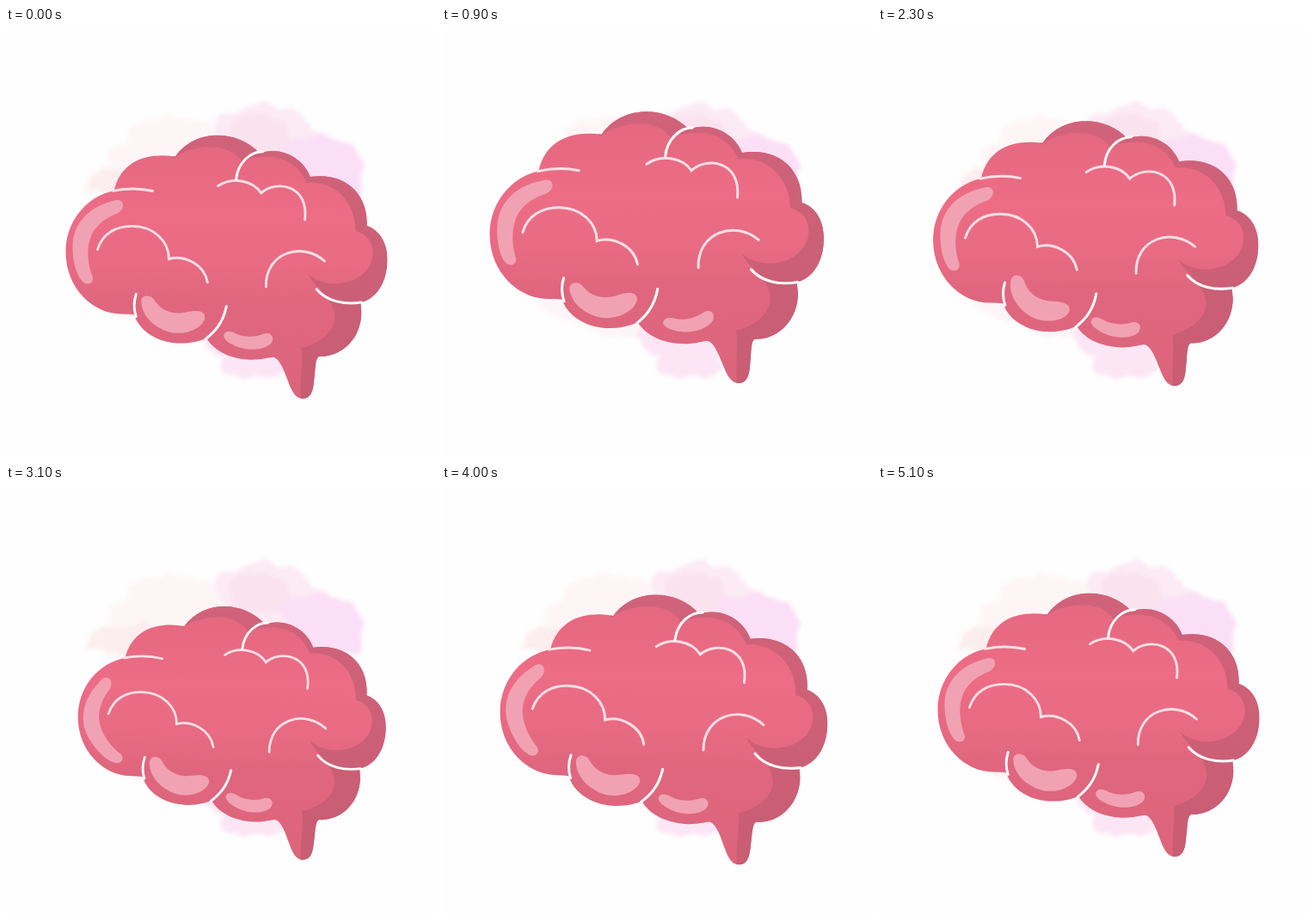
An HTML page for the animation above (5200 ms loop, 500 by 500 pixels).

```html
<!DOCTYPE html>
<html lang="en">
<head>
<meta charset="utf-8">
<title>Brain</title>
<style>
  html, body { margin: 0; width: 100%; height: 100%; overflow: hidden; background: #fefefe; }
  svg { display: block; width: 100vw; height: 100vh; }
  .line { fill: none; stroke: #fae0e5; stroke-width: 2.9; stroke-linecap: round; }
  .edge { stroke: #fffafa; stroke-width: 3; }
  .gloss { fill: #f1a2b2; }
</style>
</head>
<body>
<svg viewBox="0 0 500 500">
  <defs>
    <linearGradient id="skin" gradientUnits="userSpaceOnUse" x1="0" y1="130" x2="0" y2="430">
      <stop offset="0" stop-color="#e4687f"/>
      <stop offset=".3" stop-color="#ed6c86"/>
      <stop offset=".5" stop-color="#e86a83"/>
      <stop offset=".65" stop-color="#df667e"/>
      <stop offset="1" stop-color="#dc657c"/>
    </linearGradient>
    <linearGradient id="shade" gradientUnits="userSpaceOnUse" x1="0" y1="130" x2="0" y2="400">
      <stop offset="0" stop-color="#d0637a"/>
      <stop offset="1" stop-color="#c85d73"/>
    </linearGradient>
    <filter id="wash" filterUnits="userSpaceOnUse" x="0" y="0" width="500" height="500" color-interpolation-filters="sRGB">
      <feTurbulence type="fractalNoise" baseFrequency=".05" numOctaves="3" seed="4" result="n"/>
      <feDisplacementMap in="SourceGraphic" in2="n" scale="14" xChannelSelector="R" yChannelSelector="G"/>
      <feGaussianBlur stdDeviation="2"/>
    </filter>
    <path id="shape" d="M125 191 C94 197 69 226 69 262 C69 305 102 334 133 334 Q143 334 149 335
      C155 355 178 368 203 368 C218 368 228 364 233 362 C243 378 262 386 285 387
      C297 387 303 385 310 384 C318 385 323 399 328 412 C333 426 338 432 345 432
      C354 432 357 424 358 412 C360 398 359 385 364 383 C392 384 413 360 413 332
      L412 320 C430 316 443 297 443 270 C443 251 434 236 419 231
      C421 195 395 168 353 174 C345 152 318 138 294 147 C270 120 220 117 196 151
      C165 146 133 155 125 191Z"/>
    <clipPath id="inside"><use href="#shape"/></clipPath>
  </defs>

  <g filter="url(#wash)">
    <path fill="#fef5f6" d="M92 192 Q88 166 120 162 Q116 140 140 132 Q140 108 180 106 Q225 98 246 116 L260 190 L160 210Z"/>
    <path fill="#fcedef" d="M95 190 Q94 170 118 165 Q150 168 160 150 L180 200Z"/>
    <path fill="#fceaf4" d="M246 120 Q240 100 270 98 Q290 82 318 95 Q350 94 358 116 Q372 130 350 160 L260 170Z"/>
    <path fill="#fbe2ef" d="M258 112 Q285 92 312 104 Q336 116 326 145 L270 150Z"/>
    <path fill="#fbdff6" d="M318 142 Q340 122 372 128 Q408 130 412 152 Q420 170 410 196 L340 190Z"/>
    <path fill="#fdf5f7" d="M112 318 Q125 340 160 342 Q185 368 235 358 L240 320Z"/>
    <path fill="#fce6f5" d="M232 350 L324 350 Q322 376 328 396 Q310 408 292 406 Q276 416 266 406 Q246 404 252 386 Q228 372 232 350Z"/>
  </g>

  <g id="brain">
    <use href="#shape" fill="url(#skin)"/>
    <g clip-path="url(#inside)" fill="url(#shade)">
      <path d="M194 153 C215 137 260 131 275 159 L283 152 L296 146 L262 110 L180 120Z"/>
      <path d="M284 153 C314 146 338 156 349 181 C383 178 406 205 406 237
        C425 241 432 262 421 280 C405 302 370 304 351 287 C356 300 378 312 382 334
        C384 352 366 368 343 373 C346 388 341 408 343 436 L470 440 L470 100 L300 100Z"/>
    </g>
    <path class="line" d="M106 259 C112 240 128 232 146 232 C172 232 189 250 189 270 C207 265 230 276 234 297"/>
    <path class="line" d="M246 185 C262 174 286 178 296 193 C314 177 352 184 347 224"/>
    <path class="line" d="M302 302 C301 262 344 249 370 272"/>
    <path class="line" d="M124 191 Q148 186 170 191"/>
    <path class="line edge" d="M267 177 C269 157 284 145 298 145"/>
    <path class="line edge" d="M361 305 C373 319 393 323 413 320"/>
    <path class="line edge" d="M151 311 C148 320 148 328 151 337"/>
    <path class="line edge" d="M256 325 C252 345 242 355 232 363"/>
    <path class="gloss" d="M126 202 C96 209 77 229 77 256 C77 274 82 290 89 297 C95 302 103 298 100 290
      C93 272 93 250 102 237 C110 226 119 221 129 217 C140 211 136 199 126 202Z"/>
    <path class="gloss" d="M157 319 C158 311 169 311 173 319 C181 331 195 335 209 332
      C222 329 232 330 231 339 C228 350 211 358 194 356 C174 352 157 337 157 319Z"/>
    <path class="gloss" d="M253 358 C255 352 263 354 268 357 C277 361 290 361 299 357
      C308 354 313 361 308 368 C300 376 283 377 269 372 C259 368 252 363 253 358Z"/>
  </g>
</svg>
<script>
  const LOOP = 5200, STEP = 100;
  const CYCLE = LOOP - STEP; // the last step repeats the first pose

  // Turning points of each motion: [time, value]
  const lift = [[1550, -24.4], [1750, -24.4], [3200, 3], [4200, 8.8]];
  const tilt = [[1700, -1.36], [3400, 1.25], [3700, 1.25]];
  const scale = [[0, 1], [450, .986], [1000, 1.043], [1750, 1.044], [3050, .957], [3700, 1.021]];
  const swings = [
    { pivot: '140 262', turns: [[0, 0], [500, 0], [1750, 21], [3150, -32]] },
    { pivot: '203 318', turns: [[0, 0], [1900, -11], [2350, 16], [3100, 4]] },
    { pivot: '280 320', turns: [[0, 0], [900, -12], [2300, 5]] }
  ];
  const brain = document.getElementById('brain');
  const glosses = document.querySelectorAll('.gloss');

  // Sine easing from one turning point to the next, wrapping round the cycle
  function at(turns, t) {
    const [firstTime, firstValue] = turns[0];
    const [lastTime, lastValue] = turns[turns.length - 1];
    const ring = [[lastTime - CYCLE, lastValue], ...turns, [firstTime + CYCLE, firstValue]];
    const i = ring.findIndex(([time]) => time > t);
    const [t0, v0] = ring[i - 1], [t1, v1] = ring[i];
    const ease = (1 - Math.cos(Math.PI * (t - t0) / (t1 - t0))) / 2;
    return v0 + (v1 - v0) * ease;
  }

  function draw(now) {
    const t = Math.floor(now % LOOP / STEP) * STEP % CYCLE;
    brain.setAttribute('transform',
      `translate(345 ${432 + at(lift, t)}) rotate(${at(tilt, t)}) scale(${at(scale, t)}) translate(-345 -432)`);
    swings.forEach(({ pivot, turns }, i) =>
      glosses[i].setAttribute('transform', `rotate(${at(turns, t)} ${pivot})`));
  }

  const start = performance.now();
  function tick() {
    draw(performance.now() - start);
    requestAnimationFrame(tick);
  }
  tick();
</script>
</body>
</html>
```
